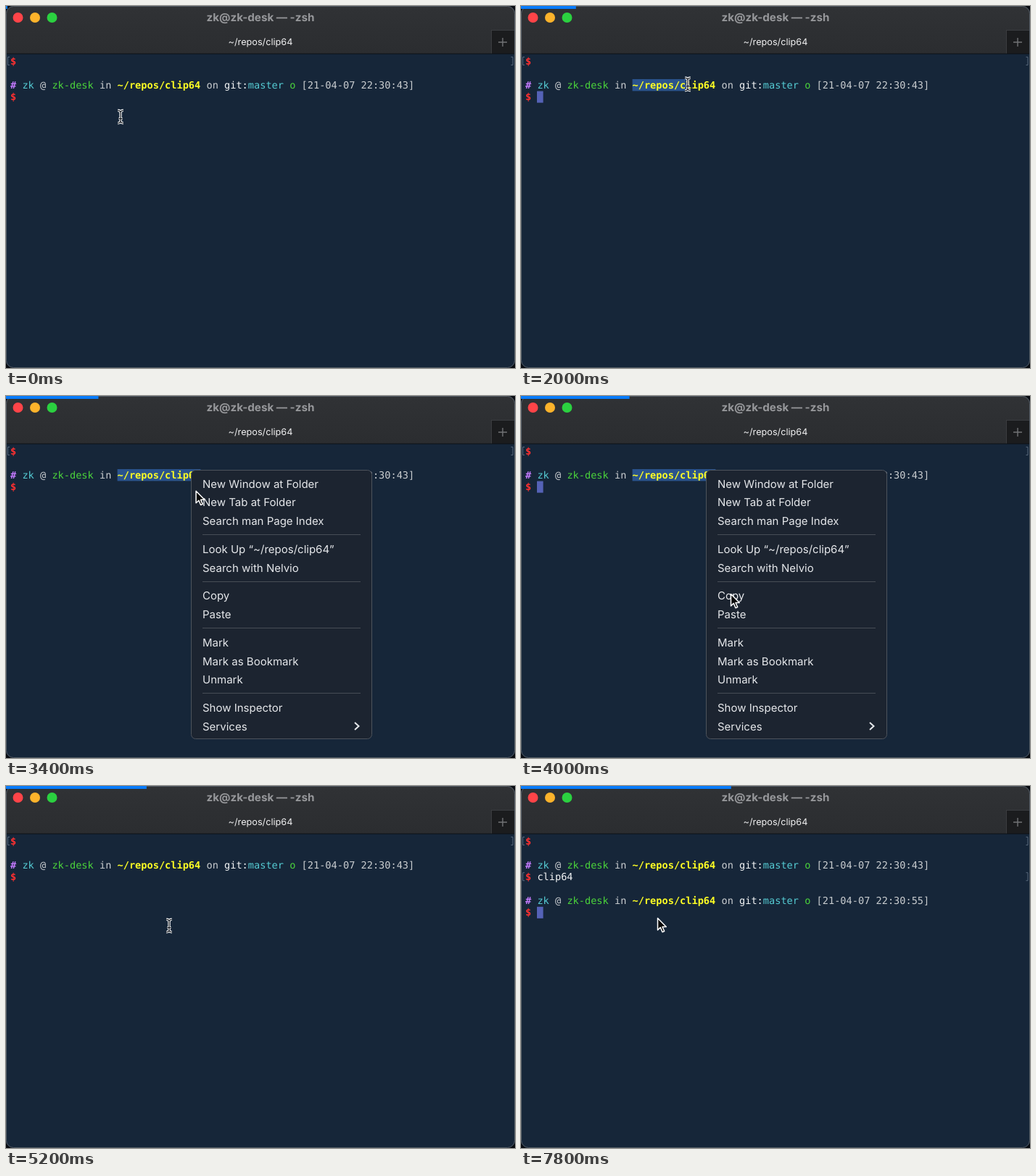
Recreate the animation shown at these times as an HTML page. Size 702 px wide and 500 px high, loop 8000 ms.

```html
<!DOCTYPE html>
<html lang="en">
<head>
<meta charset="utf-8">
<title>Terminal</title>
<style>
  html, body { margin: 0; width: 100%; height: 100%; overflow: hidden; background: #070a10; }
  svg { display: block; width: 702px; height: 500px; }
  text { white-space: pre; text-rendering: geometricPrecision; }
  .mono { font: 13.62px "DejaVu Sans Mono", monospace; fill: #c9cdd0; }
  .ui { font: 15px Inter, sans-serif; fill: #e6e8eb; }
  .title { font-weight: 700; fill: #97989b; text-anchor: middle; }
  .tab { font-size: 12.7px; fill: #f1f1f2; text-anchor: middle; }
  .hash { fill: #c57bff; font-weight: 700; }
  .cyan { fill: #55cbd3; }
  .green { fill: #4bd43b; }
  .path { fill: #ffff24; font-weight: 700; }
  .white { fill: #f4f6f7; }
  .red { fill: #ff3030; font-weight: 700; }
  .mark { fill: none; stroke: #56677a; }
</style>
</head>
<body>
<svg viewBox="0 0 702 500">
  <defs>
    <clipPath id="window"><rect width="702" height="500" rx="10"/></clipPath>
    <linearGradient id="chrome" x2="0" y2="1">
      <stop stop-color="#303235"/><stop offset="1" stop-color="#2b2d30"/>
    </linearGradient>
    <path id="beam" d="M-3.8 -8.7Q0 -8.7 0 -5.8Q0 -8.7 3.8 -8.7M0 -5.8V5.8M-3.8 8.7Q0 8.7 0 5.8Q0 8.7 3.8 8.7M-2.5 2.6H2.5" fill="none"/>
  </defs>
  <g clip-path="url(#window)">
    <rect width="702" height="500" fill="#162639"/>
    <rect width="702" height="66" fill="url(#chrome)"/>
    <rect x="670" y="33" width="32" height="33" fill="#1b1c1e"/>
    <path d="M669.5 33V66M670 33.5H702" stroke="#3b3d40"/>
    <path d="M0 66H702" stroke="#0c1017"/>
    <path d="M679 50H691M685 44V56" stroke="#717376" stroke-width="1.4"/>
    <circle cx="16.5" cy="16" r="7" fill="#ff4448"/>
    <circle cx="40" cy="16" r="7" fill="#fdb32b"/>
    <circle cx="63.5" cy="16" r="7" fill="#2bd140"/>
    <text class="ui title" x="351" y="21.3" style="font-size:15.2px">zk@zk-desk — -zsh</text>
    <text class="ui tab" x="351" y="54">~/repos/clip64</text>

    <rect id="selection" x="153.6" y="101" height="16.4" fill="#2a538d"/>
    <rect id="block" x="22" width="8.6" height="16" fill="#5562b7"/>
    <g id="terminal"></g>
    <g id="menu">
      <rect x="255.5" y="102.5" width="249" height="371" rx="6" fill="#1c2430" stroke="#4d535c"/>
    </g>
  </g>
  <rect x=".5" y=".5" width="701" height="499" rx="10" fill="none" stroke="#535b64"/>
  <rect id="progress" height="4" fill="#087bfa"/>
  <g id="ibeam">
    <use href="#beam" stroke="#fff" stroke-width="3.4"/>
    <use href="#beam" stroke="#10151c" stroke-width="1.2"/>
  </g>
  <path id="arrow" d="M0 0V16.4L3.8 12.9L6.5 19.2L9.2 18L6.5 12H11.8Z" fill="#080808" stroke="#fff" stroke-width="1.5" stroke-linejoin="round"/>
</svg>
<script>
const LOOP = 8000, STEP = 200, CELL = 8.2, LEFT = 6, ROW = 16.4;
const MENU_OPEN = 3200, MENU_CLOSE = 4400, DESELECT = 4800;
const TYPE_START = 5400, ENTER = 6400, POINTER_BACK = 7400;
const command = 'clip64';
const $ = id => document.getElementById(id);
const show = (node, on) => node.setAttribute('visibility', on ? 'visible' : 'hidden');
const baseline = row => 80.8 + row * ROW;

// time, x, y of the pointer
const pointerPath = [
  [0, 158, 153], [400, 158, 153], [1200, 154, 110], [1400, 156, 108],
  [2000, 230, 108], [2400, 267, 108], [2800, 260, 108], [3200, 257, 105],
  [4000, 289.5, 273.5], [4400, 289.5, 273.5], [5000, 225, 193], [7200, 225, 193], [7800, 188.5, 182.5]
];

function pointerAt(time) {
  const i = pointerPath.findIndex(point => point[0] > time);
  if (i < 0) return pointerPath.at(-1).slice(1);
  const [t0, x0, y0] = pointerPath[i - 1], [t1, x1, y1] = pointerPath[i];
  const k = (time - t0) / (t1 - t0), ease = k * k * (3 - 2 * k);
  return [x0 + (x1 - x0) * ease, y0 + (y1 - y0) * ease];
}

const span = (name, text) => `<tspan class="${name}">${text}</tspan>`;
const line = (row, body) => `<text class="mono" x="${LEFT}" y="${baseline(row)}">${body}</text>`;
const info = (row, clock) => line(row,
  span('hash', '#') + ' ' + span('cyan', 'zk') + ' @ ' + span('green', 'zk-desk') + ' in ' +
  span('path', '~/repos/clip64') + ' on ' + span('white', 'git:') + span('cyan', 'master') +
  ' ' + span('green', 'o') + ` [21-04-07 ${clock}]`);
const prompt = (row, id = '') => line(row, span('red', '$') + ` <tspan class="white" id="${id}"></tspan>`);
const brackets = row => {
  const y = 70.5 + row * ROW;
  return `<path class="mark" d="M5 ${y}H2.5v11H5M696.5 ${y}H699v11H696.5"/>`;
};

$('terminal').innerHTML = brackets(0) + prompt(0, 'empty') + info(2, '22:30:43') + prompt(3, 'typed') +
  `<g id="result">${brackets(3) + info(5, '22:30:55') + prompt(6, 'next')}</g>`;

const menuGroups = [
  [121, 'New Window at Folder', 'New Tab at Folder', 'Search man Page Index'],
  [211.3, 'Look Up “~/repos/clip64”', 'Search with Nelvio'],
  [275.8, 'Copy', 'Paste'],
  [340.2, 'Mark', 'Mark as Bookmark', 'Unmark'],
  [430.3, 'Show Inspector', 'Services']
];
$('menu').innerHTML += menuGroups.map(([top, ...items], i) =>
  (i ? `<path d="M271 ${Math.round(top - 20) + .5}H489" stroke="#474d56"/>` : '') +
  items.map((item, n) => `<text class="ui" x="271" y="${top + n * 25.8 + 5.5}">${item}</text>`).join('')
).join('') + '<path d="M481 451L486.5 456L481 461" fill="none" stroke="#e6e8eb" stroke-width="2"/>';

function blockVisible(time) {
  if (time >= ENTER) return time < 7000 || time >= 7600;
  if (time >= TYPE_START) return true;
  const phase = time % 1800;
  return phase >= 200 && phase < 1000;
}

function selectedCells(time, x) {
  if (time < 1400 || time >= DESELECT) return 0;
  return time >= 2400 ? 14 : Math.max(0, Math.round((x - 153.6) / CELL));
}

function draw(time) {
  const [x, y] = pointerAt(time);
  const done = time >= ENTER, menuOpen = time >= MENU_OPEN && time < MENU_CLOSE;
  const letters = Math.max(0, Math.min(command.length, Math.floor((time - TYPE_START) / 150) + 1));
  const hidden = time >= TYPE_START && time < POINTER_BACK;
  const arrow = menuOpen || time >= POINTER_BACK;

  $('progress').setAttribute('width', 2 + time * .0369);
  $('selection').setAttribute('width', selectedCells(time, x) * CELL);
  $('typed').textContent = command.slice(0, letters);
  show($('result'), done);
  show($('menu'), menuOpen);

  $('block').setAttribute('x', 22 + (done ? 0 : letters * CELL));
  $('block').setAttribute('y', 68.4 + (done ? 6 : 3) * ROW);
  show($('block'), blockVisible(time));

  for (const id of ['ibeam', 'arrow']) {
    $(id).setAttribute('transform', `translate(${x} ${y})`);
    show($(id), !hidden && arrow === (id === 'arrow'));
  }
}

const start = performance.now();
function tick() {
  const time = (performance.now() - start) % LOOP;
  draw(Math.floor(time / STEP) * STEP);
  requestAnimationFrame(tick);
}
tick();
</script>
</body>
</html>
```
